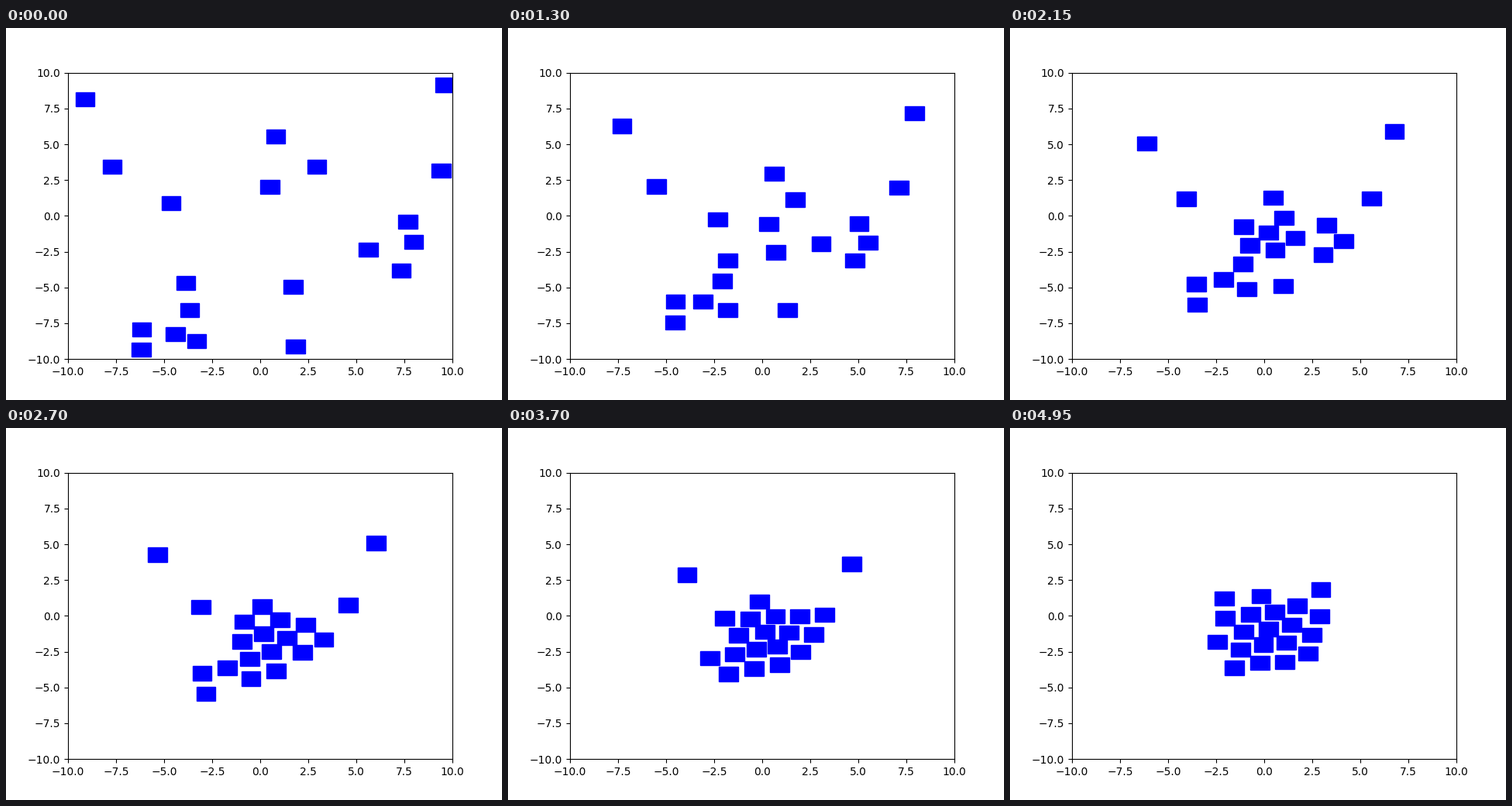
Animation of 640x480 px, one loop 5000 ms. Source, as a matplotlib script:

```python
import numpy as np
import matplotlib.pyplot as plt
from matplotlib.animation import FuncAnimation
from matplotlib.patches import Rectangle

FRAMES, INTERVAL = 100, 50
SPEED = 0.1       # pull towards the flock's centre, per frame
SPACING = 1.46    # boxes closer than this push each other apart
STIFFNESS = 0.5   # share of the overlap undone per frame
SUBSTEPS = 4

START = np.array([
    (-9.11, 8.14), (-7.70, 3.43), (-4.64, 0.89), (0.81, 5.54),
    (0.52, 2.02), (2.94, 3.43), (9.62, 9.13), (9.42, 3.16),
    (7.68, -0.41), (7.98, -1.82), (5.63, -2.36), (7.34, -3.82),
    (-3.87, -4.69), (-3.67, -6.58), (-4.40, -8.26), (-3.31, -8.74),
    (-6.17, -7.93), (-6.19, -9.34), (1.71, -4.96), (1.85, -9.12)])


def pull(pos):
    """Steady speed towards the flock's current centre."""
    to_center = pos.mean(axis=0) - pos
    dist = np.linalg.norm(to_center, axis=1, keepdims=True)
    return SPEED * to_center / np.maximum(dist, SPEED)


def push(pos):
    """Spring-like separation of every pair that is too close."""
    gap = pos[:, None] - pos[None, :]
    dist = np.linalg.norm(gap, axis=2, keepdims=True)
    overlap = np.clip(SPACING - dist, 0, None)
    return STIFFNESS * (overlap * gap / np.maximum(dist, 1e-9)).sum(axis=1)


def simulate():
    track = [START]
    for _ in range(FRAMES - 1):
        pos = track[-1]
        for _ in range(SUBSTEPS):
            pos = pos + (pull(pos) + push(pos)) / SUBSTEPS
        track.append(pos)
    return track


track = simulate()

fig, ax = plt.subplots(figsize=(6.4, 4.8), dpi=100)
ax.set_xlim(-10, 10)
ax.set_ylim(-10, 10)
boxes = [ax.add_patch(Rectangle(p - 0.5, 1, 1, color="blue")) for p in START]


def update(frame):
    for box, p in zip(boxes, track[frame]):
        box.set_xy(p - 0.5)
    return boxes


anim = FuncAnimation(fig, update, frames=FRAMES, interval=INTERVAL,
                     repeat=True, repeat_delay=0)
plt.show()
```
